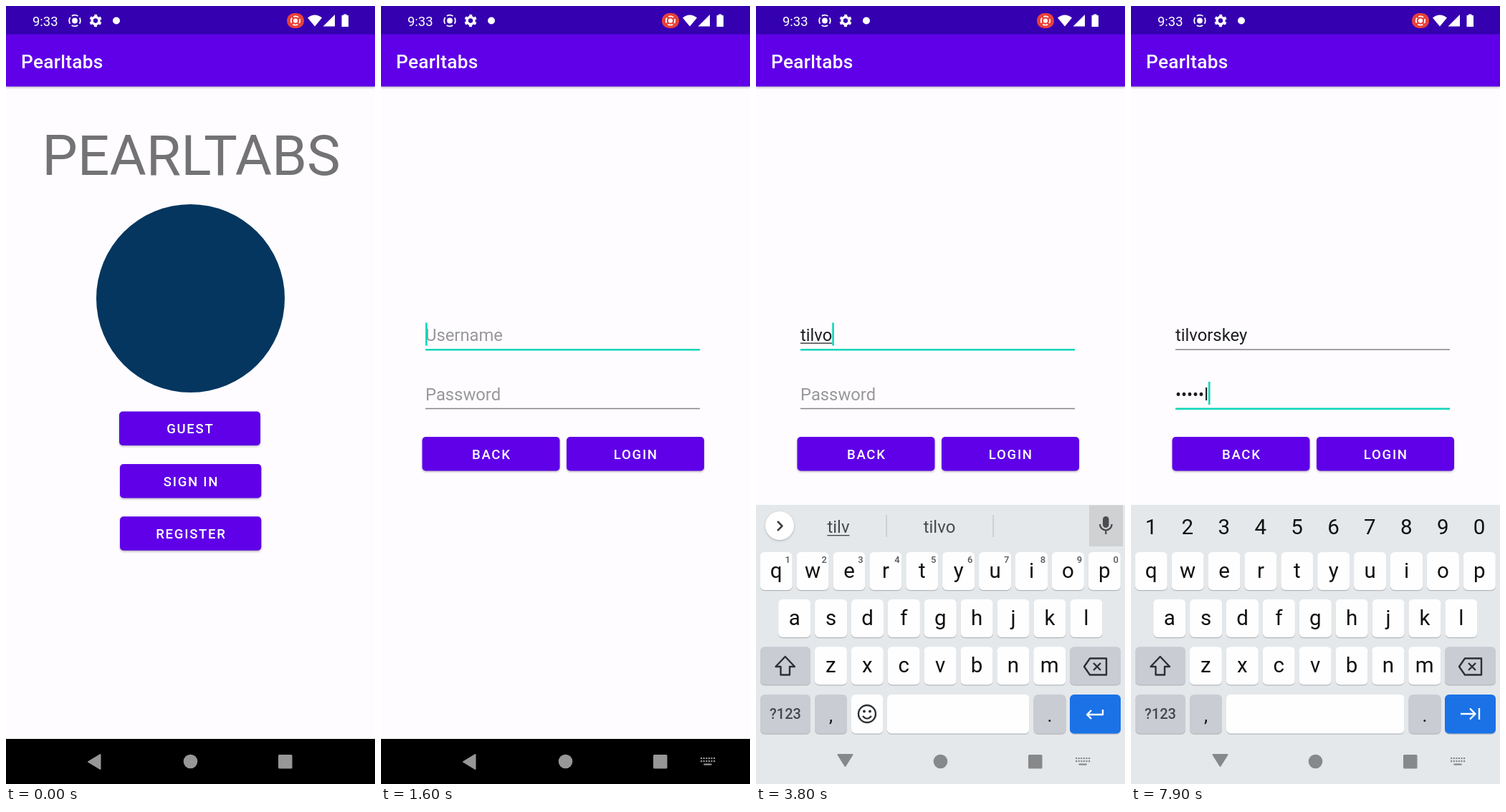
An HTML page with a canvas for the animation above (8000 ms loop, 515 by 1087 pixels).

```html
<!DOCTYPE html>
<html lang="en">
<head>
<meta charset="utf-8">
<title>Sign-in demo</title>
<style>
  html, body { margin: 0; width: 100%; height: 100%; overflow: hidden; background: #fefcff; }
  canvas { display: block; width: 515px; height: 1087px; }
</style>
</head>
<body>
<canvas id="stage"></canvas>
<script>
const W = 515, H = 1087, LOOP = 8000;
const canvas = document.getElementById('stage');
const dpr = window.devicePixelRatio || 1;
canvas.width = W * dpr;
canvas.height = H * dpr;
const c = canvas.getContext('2d');

const APP = 'Pearltabs', USER = 'tilvorskey', PASS = 'secral';
const PAPER = '#fefcff', VIOLET = '#5f00e8', DARK_VIOLET = '#3500b0', TEAL = '#0dd6b8';
const KEY = '#fefefe', SIDE_KEY = '#c9cdd3', BOARD = '#e4e8eb', ICON = '#4a4c4f';

// Timeline in ms
const PRESS = 600, OPEN = 759, FOCUS = 1500, BOARD_UP = 1700;
const TYPE_USER = 3000, USER_STEP = 200, STRIP_LAG = 150;
const TAP_PASS = 5400, PASS_BOARD = 5600, TYPE_PASS = 6270, PASS_STEP = 300;

const clamp = v => Math.max(0, Math.min(1, v));
const typed = (t, start, step, max) => Math.max(0, Math.min(max, Math.floor((t - start) / step) + 1));

function rect(x, y, w, h, color, r = 0) {
  c.fillStyle = color;
  c.beginPath();
  c.roundRect(x, y, w, h, r);
  c.fill();
}

function dot(x, y, r, color) {
  c.fillStyle = color;
  c.beginPath();
  c.arc(x, y, r, 0, 7);
  c.fill();
}

function ring(x, y, r, width, color, dash = [], offset = 0) {
  c.strokeStyle = color;
  c.lineWidth = width;
  c.setLineDash(dash);
  c.lineDashOffset = offset;
  c.beginPath();
  c.arc(x, y, r, 0, Math.PI * 2);
  c.stroke();
  c.setLineDash([]);
}

function fill(path, color) {
  c.fillStyle = color;
  c.fill(new Path2D(path));
}

function stroke(path, color, width) {
  c.strokeStyle = color;
  c.lineWidth = width;
  c.stroke(new Path2D(path));
}

// Draws text and returns its width
function text(s, x, y, size, color, { weight = 400, align = 'left', spacing = 0 } = {}) {
  c.font = `${weight} ${size}px Roboto, sans-serif`;
  c.letterSpacing = spacing + 'px';
  c.textAlign = align;
  c.fillStyle = color;
  c.fillText(s, x, y);
  return c.measureText(s).width;
}

function withShadow(blur, dy, color, draw) {
  c.save();
  c.shadowColor = color;
  c.shadowBlur = blur * dpr;
  c.shadowOffsetY = dy * dpr;
  draw();
  c.restore();
}

function gear(x, y, r, color) {
  ring(x, y, r * 0.58, r * 0.42, color);
  const tooth = Math.PI * r * 0.84 / 6;
  ring(x, y, r * 0.84, r * 0.36, color, [tooth, tooth], -tooth / 2);
}

// Four arcs centred on the axes around a dot
function recordIcon(x, y, r) {
  const quarter = Math.PI * r / 2, arc = quarter * 0.74;
  ring(x, y, r, 1.8, '#fff', [arc, quarter - arc], arc / 2);
  dot(x, y, r * 0.5, '#fff');
}

function button(label, x, y, w, h = 47.5) {
  withShadow(3, 1.6, 'rgba(0,0,0,.26)', () => rect(x, y, w, h, VIOLET, 5));
  return () => text(label, x + w / 2 + 0.8, y + h / 2 + 7, 18.6, '#fff',
    { weight: 500, align: 'center', spacing: 1.7 });
}

function windowFrame() {
  rect(0, 0, W, H, PAPER);
  withShadow(3, 1, 'rgba(0,0,0,.25)', () => rect(0, 39, W, 73.5, VIOLET));
  rect(0, 0, W, 39.5, DARK_VIOLET);
  text(APP, 21, 86.5, 26.2, '#fff', { weight: 500, spacing: 0.3 });
  rect(0, 1024, W, H - 1024, '#000');
}

function ripple(t, x, y, w, h) {
  if (t < PRESS) return;
  const r = 25 + 85 * clamp((t - PRESS + 60) / 260);
  const glow = c.createRadialGradient(x + w / 2, y + h / 2, 0, x + w / 2, y + h / 2, r);
  glow.addColorStop(0, 'rgba(255,255,255,.23)');
  glow.addColorStop(0.72, 'rgba(255,255,255,.22)');
  glow.addColorStop(1, 'rgba(255,255,255,.08)');
  c.save();
  c.beginPath();
  c.roundRect(x, y, w, h, 5);
  c.clip();
  dot(x + w / 2, y + h / 2, r, glow);
  c.restore();
}

function welcomeScreen(t) {
  windowFrame();
  text(APP.toUpperCase(), 258.5, 236, 78.6, '#737375', { align: 'center' });
  dot(257.5, 408.5, 131.5, '#04365f');
  button('GUEST', 158, 566.5, 197)();
  const signInLabel = button('SIGN IN', 159, 640, 197.3);
  ripple(t, 159, 640, 197.3, 47.5);
  signInLabel();
  button('REGISTER', 159, 713.3, 197.3)();
}

function field({ value, hint, baseline, focused, underlined, caret }) {
  const width = text(value || hint, 62, baseline, 23.8, value ? '#1d1d1f' : '#98979a');
  const end = 62 + (value ? width : 0);
  if (underlined && value) rect(62, baseline + 2.5, width, 1.3, '#1d1d1f');
  const lineY = baseline + 12;
  if (focused) rect(62, lineY - 1, 383, 2.6, TEAL);
  else rect(62, lineY - 0.7, 383, 1.4, '#858387');
  if (focused && caret) rect(end, baseline - 25.5, 2.6, 32, TEAL);
}

function loginScreen(t) {
  windowFrame();
  const nUser = typed(t, TYPE_USER, USER_STEP, USER.length);
  const nPass = typed(t, TYPE_PASS, PASS_STEP, PASS.length);
  const onPass = t >= TAP_PASS;

  // The caret restarts its blink at every edit
  const edits = [FOCUS, BOARD_UP + 100, TAP_PASS];
  if (nUser) edits.push(TYPE_USER + (nUser - 1) * USER_STEP);
  if (nPass) edits.push(TYPE_PASS + (nPass - 1) * PASS_STEP);
  const lastEdit = Math.max(...edits.filter(e => e <= t));
  const caret = (t - lastEdit) % 1000 < 500;

  field({ value: USER.slice(0, nUser), hint: 'Username', baseline: 468,
    focused: t >= FOCUS && !onPass, underlined: !onPass, caret });
  field({ value: nPass ? '•'.repeat(nPass - 1) + PASS[nPass - 1] : '', hint: 'Password',
    baseline: 550.5, focused: onPass, caret });
  button('BACK', 57.5, 602, 192)();
  button('LOGIN', 259, 602, 192)();
}

function key(x, y, w, h, color) {
  rect(x, y + 1.3, w, h, '#b4b8bc', 6);
  rect(x, y, w, h, color, 6);
}

function letterRow(letters, x, y, digits) {
  [...letters].forEach((ch, i) => {
    const mid = x + i * 50.9;
    key(mid - 22.5, y, 45, 53, KEY);
    text(ch, mid, y + 35.5, 29.5, '#111', { align: 'center' });
    if (digits) text((i + 1) % 10, mid + 16, y + 14.5, 13, '#55575a', { weight: 500, align: 'center' });
  });
}

function toolbarIcons() {
  stroke('M94 716H107Q110 716 110 719V729L103 736H94Q91 736 91 733V719Q91 716 94 716M110 729H103V736', ICON, 2.3);
  dot(97, 722, 1.5, ICON);
  dot(104, 722, 1.5, ICON);
  stroke('M95 727Q100 732 105 727', ICON, 2);
  text('GIF', 173.5, 733, 20, ICON, { weight: 900, align: 'center', spacing: 0.5 });
  stroke('M240 717H257V737H240Z', ICON, 2.4);
  fill('M244 715H246A3 3 0 0 1 251 715H253V720H244Z', ICON);
  stroke('M243 724H254M243 728H254M243 732H250', ICON, 2);
  gear(322.5, 727, 12, ICON);
  rect(367.8, 712, 1.2, 29, '#bdc1c5');
  [405, 414.5, 424].forEach(x => dot(x, 726.5, 2.6, ICON));
}

function suggestions(n) {
  const word = USER.slice(0, n);
  const width = text(word, 115, 736, 24, '#47494c', { align: 'center' });
  rect(115 - width / 2, 739, width, 1.4, '#47494c');
  if (n < USER.length) text(USER.slice(0, n + 1), 256, 736, 24, '#47494c', { align: 'center' });
  rect(181.5, 711, 1.2, 31, '#bdc1c5');
  rect(330.5, 711, 1.2, 31, '#bdc1c5');
}

function topStrip(t) {
  const n = typed(t - STRIP_LAG, TYPE_USER, USER_STEP, USER.length);
  withShadow(3, 1, 'rgba(0,0,0,.25)', () => dot(33, 726, 20, '#fff'));
  stroke(n ? 'M30 720L36.5 726.5L30 733' : 'M36.5 720L30 726.5L36.5 733', '#3c3e41', 2.5);
  n ? suggestions(n) : toolbarIcons();
  rect(465, 697.5, 47, 57.5, '#d0d1d3');
  rect(484, 713, 8.5, 16, ICON, 4.3);
  stroke('M480 724A8.3 8.3 0 0 0 496.6 724M488.3 732V738', ICON, 2.3);
}

function keyboard(t) {
  const secret = t >= PASS_BOARD;
  rect(0, 697, W, 400, BOARD);
  if (secret) {
    [...'1234567890'].forEach((d, i) =>
      text(d, 28 + i * 50.9, 738, 29.5, '#111', { align: 'center' }));
  } else topStrip(t);

  letterRow('qwertyuiop', 28.2, 763, !secret);
  letterRow('asdfghjkl', 53.7, 829);
  letterRow('zxcvbnm', 104.4, 895.3);

  key(6, 895.3, 70, 53, SIDE_KEY);
  stroke('M40.7 909L54 923H47V934.5H34.5V923H27.5Z', '#2d2f32', 2.4);
  key(438, 895.3, 71, 53, SIDE_KEY);
  stroke('M458 923L466 911.5H489V934.5H466ZM471 918L481 928M481 918L471 928', '#2d2f32', 2.4);

  key(6, 962, 70, 54.5, SIDE_KEY);
  text('?123', 41, 996, 20, '#44474a', { align: 'center', weight: 500 });
  key(82, 962, 45, 54.5, SIDE_KEY);
  text(',', 104.5, 1000, 26, '#111', { align: 'center' });
  if (!secret) {
    key(133, 962, 44.5, 54.5, KEY);
    ring(155, 989, 12, 2.4, '#2d2f32');
    dot(151, 985.5, 1.9, '#2d2f32');
    dot(159, 985.5, 1.9, '#2d2f32');
    stroke('M149 992Q155 999 161 992', '#2d2f32', 2.2);
  }
  const spaceX = secret ? 133 : 183;
  key(spaceX, 962, 381.5 - spaceX, 54.5, KEY);
  key(387.5, 962, 45, 54.5, SIDE_KEY);
  text('.', 410, 1000, 26, '#111', { align: 'center' });
  key(438, 962, 71, 54.5, '#1a72e6');
  stroke(secret ? 'M460 989H480M473 981.5L480.5 989L473 996.5M486 981V997'
    : 'M484 983V990H462M468 984L462 990L468 996', '#fff', 2.4);
}

function statusBar() {
  text('9:33', 37, 27.5, 18.4, '#fff');
  recordIcon(96, 20.5, 7.8);
  gear(125, 20.5, 8.5, '#fff');
  dot(154, 20.5, 5, '#fff');
  rect(392, 10, 24, 21, '#e8413a', 10);
  recordIcon(404, 20.5, 6.2);
  fill('M421 16.5Q431 8.5 441 16.5L431 28.5Z', '#fff');
  fill('M442.5 28.5L459 12V28.5Z', '#fff');
  fill('M471 11.5H475.5V13H478V29H468.5V13H471Z', '#fff');
}

function navButtons(t, boardOpen) {
  const color = boardOpen ? '#87888a' : '#979797';
  const triangle = boardOpen ? 'M114.5 1046H134.5L124.5 1062Z' : 'M115 1056L131.5 1046V1066Z';
  fill(triangle, color);
  stroke(triangle, color, 2);
  dot(257.5, 1055.5, 9.8, color);
  rect(380, 1046, 19.5, 19.5, color, 1.5);
  if (t < FOCUS) return;
  for (let row = 0; row < 2; row++)
    for (let i = 0; i < 6; i++) rect(446 + i * 3.6, 1050 + row * 4, 2.2, 2.2, color);
  rect(450.5, 1058.5, 11, 2.2, color);
}

function scaled(s, alpha, draw) {
  c.save();
  c.globalAlpha = alpha;
  c.translate(W / 2, H / 2);
  c.scale(s, s);
  c.translate(-W / 2, -H / 2);
  draw();
  c.restore();
}

// Short slow start, fast middle, long settling
function openEase(p) {
  const q = p ** 4;
  return p >= 1 ? 1 : q / (q + 0.182 ** 4);
}

function render(t) {
  c.setTransform(dpr, 0, 0, dpr, 0, 0);
  c.lineJoin = 'round';
  const opening = clamp((t - OPEN) / 400);
  const e = openEase(opening);
  if (opening < 1) scaled(1 + 0.1 * e, 1, () => welcomeScreen(t));
  const alpha = clamp((t - OPEN - 50) / 50);
  if (alpha > 0) scaled(0.85 + 0.15 * e, alpha, () => loginScreen(t));

  const rise = 1 - (1 - clamp((t - BOARD_UP + 20) / 280)) ** 3;
  if (rise > 0) {
    c.save();
    c.translate(0, (1 - rise) * 390);
    keyboard(t);
    c.restore();
  }
  statusBar();
  navButtons(t, rise > 0);
}

const begin = performance.now();
function tick() {
  render((performance.now() - begin) % LOOP);
  requestAnimationFrame(tick);
}
tick();
</script>
</body>
</html>
```
